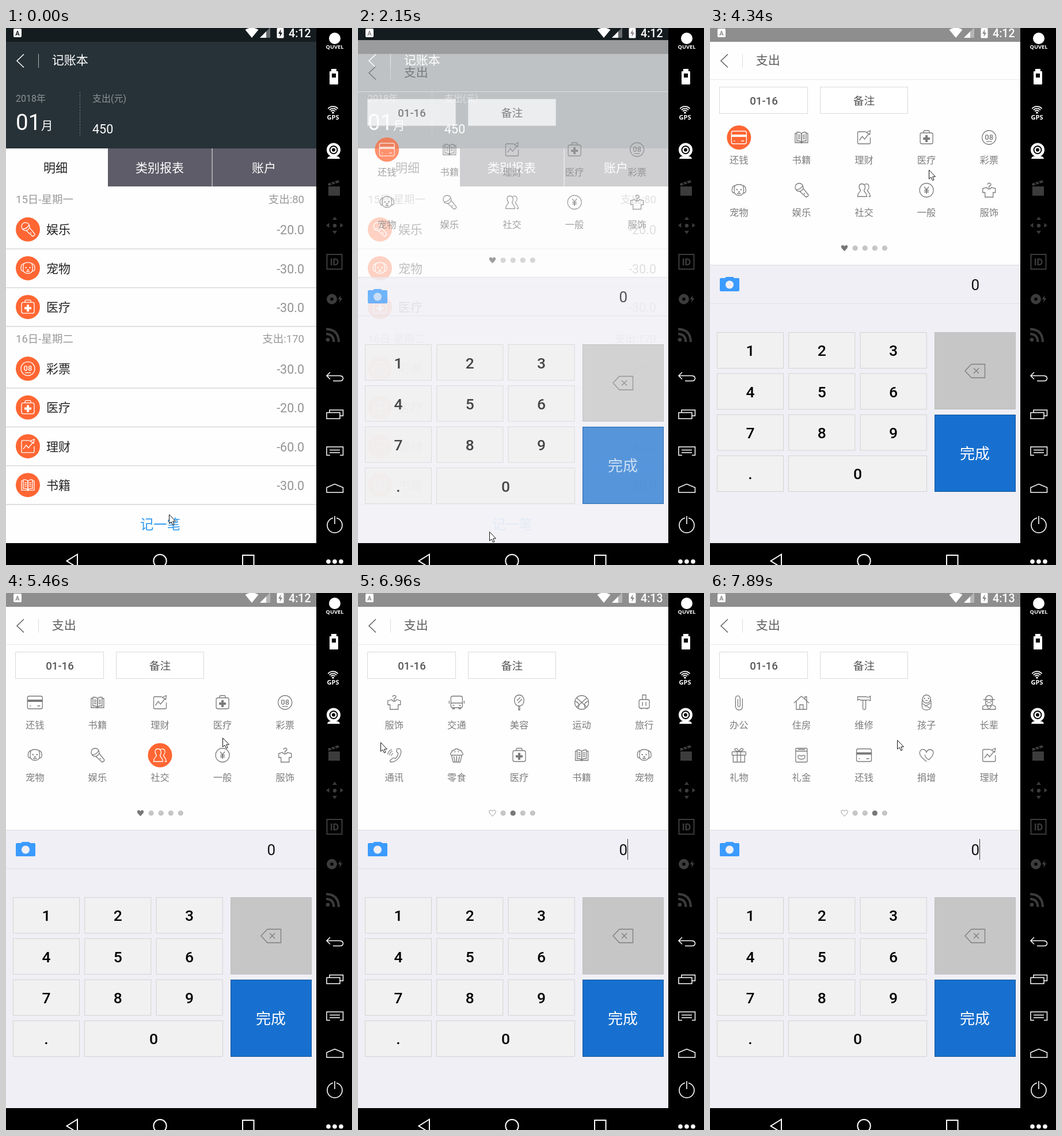
These frames come from a looping animation (601 px wide and 932 px high, 8 s). An HTML page with a canvas:

```html
<!DOCTYPE html>
<html lang="zh">
<head>
<meta charset="utf-8">
<title>记账本</title>
<style>
html, body { margin: 0; width: 100%; height: 100%; overflow: hidden; background: #000; }
canvas { display: block; }
</style>
</head>
<body>
<canvas id="stage" width="601" height="932"></canvas>
<script>
const ctx = document.getElementById('stage').getContext('2d');
const FONT = 'Roboto, "Noto Sans CJK SC", "Noto Sans CJK", sans-serif';
const LOOP = 8000, PAGE = 543, PITCH = PAGE / 5, BAR = 24, BOTTOM = 894, ORANGE = '#ff6633';

// ---- drawing helpers ----
function rect(x, y, w, h, fill, border) {
  if (fill) { ctx.fillStyle = fill; ctx.fillRect(x, y, w, h); }
  if (border) { ctx.strokeStyle = border; ctx.lineWidth = 1; ctx.strokeRect(x + .5, y + .5, w - 1, h - 1); }
}
function disc(x, y, r, color) {
  ctx.fillStyle = color;
  ctx.beginPath(); ctx.arc(x, y, r, 0, 7); ctx.fill();
}
function ring(x, y, r, color, w) {
  ctx.strokeStyle = color; ctx.lineWidth = w;
  ctx.beginPath(); ctx.arc(x, y, r, 0, 7); ctx.stroke();
}
function line(d, color, w = 1.5) {
  ctx.strokeStyle = color; ctx.lineWidth = w;
  ctx.stroke(new Path2D(d));
}
function shape(d, color) {
  ctx.fillStyle = color;
  ctx.fill(new Path2D(d), 'evenodd');
}
function text(s, x, cy, size, color, align = 'left', weight = 400, font = FONT) {
  ctx.font = `${weight} ${size}px ${font}`;
  ctx.textAlign = align;
  ctx.fillStyle = color;
  const lift = /[^\x00-\x7f]/.test(s) ? .375 : .358;
  ctx.fillText(s, x, cy + size * lift);
}
const O = (x, y, r) => `M${x + r} ${y}A${r} ${r} 0 1 1 ${x - r} ${y}A${r} ${r} 0 1 1 ${x + r} ${y}`;
const R = (x, y, w, h, r = 2) => `M${x + r} ${y}h${w - 2 * r}q${r} 0 ${r} ${r}v${h - 2 * r}q0 ${r} ${-r} ${r}h${2 * r - w}q${-r} 0 ${-r} ${-r}v${2 * r - h}q0 ${-r} ${r} ${-r}`;

// ---- category icons: right half (mirrored), whole outline, solid part ----
const EYES = y => O(-3.5, y, 1.2) + O(3.5, y, 1.2);
const ICONS = {
  一般: ['M0-1L4-6M0-1V6M0 0H4M0 3H4', O(0, 0, 12)],
  餐饮: ['M0-3H13C13 4 9 8 5 9V12H0M0 9H5M10-3Q9-9 0-10'],
  购物: ['M0-12Q5-12 5-9V-3M0 7H10', R(-10, -7, 20, 19)],
  服饰: ['M4-5L11-3V4H7V12H0M0-2Q3-2 4-5', 'M0-3V-7Q4-8 3-11Q0-14-3-10'],
  交通: ['M0 1H10M13-3V2M4 9V11H7V9M4 5H7', R(-10, -11, 20, 20, 3)],
  娱乐: ['', O(-4, -5, 7) + 'M-10-1Q-2 0 2-8M3-3L12 8Q12 11 8 12L-3 2M4 5L6 7'],
  社交: ['', 'M-4-11C-10-11-9-3-6 0C-6 4-11 3-11 11H5C5 4 0 4 0 0C3-3 3-11-4-11ZM1-10C10-14 10-3 6 0C6 4 11 4 11 11H8'],
  居家: ['M0-10H5Q8-10 8-6M0 4H7M0 9H11V1Q14-3 9-5Q7-5 7-2V9M9 9V12'],
  通讯: ['', 'M5-11Q12-13 12-6C11 4 4 11-5 12Q-9 11-6 8L-2 5Q0 4 2 6Q7 1 7-4Q4-5 4-8ZM-8 0Q-8-5-3-7M-5 1Q-4-2-2-3M-11-1Q-11-8-4-10'],
  零食: ['M0 12H6L9 0H0M9 0Q13-2 9-5Q8-9 4-9Q3-11 0-11M5 2L3 11M0 2V11M2-6H4'],
  美容: ['M0-13C11-13 11 6 0 6M1 6V13H0', 'M-4-3L2-9M-2 1L5-6'],
  运动: ['M9-8L-9 8M12-2Q2 0 6 10', O(0, 0, 12)],
  旅行: ['M0-13H3V-5M3-1V6M5 10V12', R(-9, -5, 18, 15, 3)],
  数码: ['M0 11H5M0 7V11', R(-12, -10, 24, 17)],
  烟酒: ['M0-11H8Q8 2 0 3V11H6M0-5H7'],
  学习: ['M0-9L13-3L0 3M7 0V7Q5 10 0 10'],
  汽车: ['M0-9H6L9-2M8 8V11M5 3H8', R(-12, -2, 24, 10)],
  医疗: ['M0-12H3Q5-12 5-10V-8', R(-11, -8, 22, 19, 3), 'M-2-4H2V0H6V4H2V8H-2V4H-6V0H-2Z'],
  书籍: ['M0-7Q4-10 8-9V6Q4 5 0 8ZM8-7H11V9H1L0 10M2-4H6M2-1H6M2 2H6'],
  宠物: ['M0-10Q4-10 7-8Q9-2 8 4Q6 9 0 9M7-8Q12-7 12 0Q12 5 8 5M0 6Q2 6 3 5', '', EYES(-1) + 'M-2 2H2L0 5Z'],
  彩票: ['M0 7H5', O(0, 0, 12)],
  办公: ['', 'M-2-6V6Q0 9 2 6V-8Q0-13-4-11Q-6-10-6-7V7Q-5 13 0 13Q6 13 6 7V-7'],
  住房: ['M0-11L13 1M9-2V12H0M3 12V4H0', 'M6-6V-10H9V-3'],
  维修: ['', 'M-11-10H4Q8-8 11-11V-3Q8-5 4-4H-6Q-8-7-11-4ZM-2-4V11Q0 14 3 11V-4'],
  孩子: ['M7-5Q9 4 7 10Q5 13 0 13M0-3L2-4', O(0, -6, 7) + 'M-7 2L6 10M7 1L-3 7', EYES(-7)],
  长辈: ['M0-12Q6-12 6-5V1Q5 6 0 6M0-5H10M5 4L11 7V12H0M0 0L3 1M4 6L0 12', '', EYES(-2)],
  礼物: ['M10 0V12H0M3-6V12M0-6Q9-8 7-11Q3-14 0-6', R(-12, -6, 24, 6, 1)],
  礼金: ['M0-7H10M0-10H6M0 2Q3-1 6 1Q7 7 0 7', R(-10, -12, 20, 24)],
  还钱: ['', R(-13, -11, 26, 22, 3) + 'M4 6H9M-9 6H-7', 'M-13-5H13V-1H-13Z'],
  捐增: ['', 'M0 11Q-12 2-12-4Q-11-11-5-10Q-1-9 0-5Q2-10 6-10Q12-9 12-4Q11 2 4 8Q-2 5-3-1'],
  理财: ['', 'M3-10H-9Q-11-10-11-8V9Q-11 11-9 11H9Q11 11 11 9V0M-8 5L-3-2L1 3L9-7M4-9L11-12L10-5Z'],
};
function icon(name, x, y, color) {
  const [half, whole, solid] = ICONS[name];
  ctx.save();
  ctx.translate(x, y);
  if (whole) line(whole, color, 1.3);
  if (solid) shape(solid, color);
  if (name === '彩票') text('08', 0, -1, 13, color, 'center', 500);
  line(half, color, 1.3);
  ctx.scale(-1, 1);
  line(half, color, 1.3);
  ctx.restore();
}

// each page: upper row, lower row
const PAGES = [
  '还钱 书籍 理财 医疗 彩票 宠物 娱乐 社交 一般 服饰',
  '一般 餐饮 购物 服饰 交通 娱乐 社交 居家 通讯 零食',
  '美容 运动 旅行 数码 烟酒 医疗 书籍 宠物 学习 汽车',
  '办公 住房 维修 孩子 长辈 礼物 礼金 还钱 捐增 理财',
].map(p => p.split(' '));

// ---- motion ----
const clamp = u => Math.min(1, Math.max(0, u));
const smooth = u => (u = clamp(u), u * u * (3 - 2 * u));

// a swipe: start, then where the pointer comes back to
const SWIPES = [[5643, 386, 252], [6597, 345, 255], [7230, 325, 255]];
const CLICKS = [1630, 5040];
// pointer moves: start, duration, goal
const MOVES = [
  [550, 400, 250, 755], [950, 410, 228, 874], [2150, 690, 137, 320], [2990, 400, 380, 246],
  [4340, 390, 263, 280], [5180, 280, 376, 251],
  ...SWIPES.flatMap(([s, x, y]) => [[s, 300, 39, 259], [s + 370, 257, x, y]]),
];
function mouse(t) {
  let x = t < 120 ? 283 : 280, y = t < 120 ? 844 : 853;
  for (const [start, span, gx, gy] of MOVES) {
    const k = smooth((t - start) / span);
    x += (gx - x) * k;
    y += (gy - y) * k;
  }
  return [Math.round(x), Math.round(y)];
}
const scrollAt = t => SWIPES.reduce((sum, [s]) => sum + PAGE * smooth((t - s) / 660), 0);
const caretOn = t => t > SWIPES[0][0] || Math.floor((t - 2940) / 560) % 2 === 1;

// ---- screens ----
function titleBar(title, color, rule) {
  line('M31 45.500L19 57L31 68.500', color, 1.5);
  rect(56, 45, 1, 24, rule);
  text(title, 79.7, 55.5, 21, color);
}
function row(name, amount, y) {
  disc(38, y, 21, ORANGE);
  icon(name, 38, y, '#fff');
  text(name, 70, y, 21, '#222');
  text(amount, 518, y + 1, 21.5, '#939393', 'right');
  rect(0, y + 33, 539, 1.5, '#d8d8d8');
}
// a day heading followed by its rows; returns the next y
function day(title, sum, y, items) {
  text(title, 17, y, 18.5, '#999');
  text(sum, 518, y, 18.5, '#999', 'right');
  items.forEach(([name, cost], i) => row(name, `-${cost}.0`, y + 52.3 + i * 67.3));
}
function ledger() {
  rect(0, 0, 539, BOTTOM, '#fefefe');
  rect(0, 0, 539, BAR, '#151c1f');
  rect(0, BAR, 539, 209 - BAR, '#273238');
  titleBar('记账本', '#fff', '#b0b6b9');
  text('2018年', 17, 122, 16, '#8c9598');
  text('01', 17, 163, 38.5, '#fff');
  text('月', 61, 169.5, 20.5, '#fff');
  ctx.setLineDash([3, 2]);
  line('M128.500 111V188', '#69747a', 1);
  ctx.setLineDash([]);
  text('支出(元)', 150, 122, 16, '#8c9598');
  text('450', 150, 175, 21.5, '#fff');
  rect(177, 209, 362, 66, '#5d5c68');
  rect(357.5, 209, 1.2, 66, '#d5d5d8');
  ['明细', '类别报表', '账户'].forEach((s, i) =>
    text(s, 86 + i * 181, 242.5, 21, i ? '#fff' : '#222', 'center'));
  day('15日-星期一', '支出:80', 297.3, [['娱乐', 20], ['宠物', 30], ['医疗', 30]]);
  day('16日-星期二', '支出:170', 539, [['彩票', 30], ['医疗', 20], ['理财', 60], ['书籍', 30]]);
  text('记一笔', 268, 861, 23.3, '#2d98f2', 'center');
}

function categories(t) {
  const scroll = scrollAt(t);
  const chosen = t < CLICKS[1] ? '还钱' : '社交';
  PAGES.forEach((names, p) => names.forEach((name, i) => {
    const x = 50.3 + (i % 5) * PITCH + p * PAGE - scroll;
    if (x < -40 || x > 580) return;
    const y = i < 5 ? 190 : 281.5, on = p === 0 && name === chosen;
    if (on) disc(x, y, 21, ORANGE);
    icon(name, x, y, on ? '#fff' : '#7a7a7a');
    text(name, x, y + 38.5, 16.3, '#7d7d7d', 'center');
  }));
  const page = Math.round(scroll / PAGE);
  const heart = 'M233.500 387.500L228.500 382Q226.500 377 230.500 377Q233 377 233.500 379Q234 377 236.500 377Q240.500 377 238.500 382Z';
  if (page === 0) shape(heart, '#777'); else line(heart, '#999', 1);
  for (let i = 1; i < 5; i++) disc(235 + i * 17.1, 382, 4.6, page === i ? '#777' : '#c5c5c5');
}
function key(label, x, y, w) {
  rect(x, y, w, 63, '#f1f1f1', '#d2d2d4');
  text(label, x + w / 2, y + 32, 26.5, '#000', 'center', 500);
}
function entry(t) {
  rect(0, 0, 539, BOTTOM, '#fefefe');
  rect(0, 0, 539, BAR, '#8e8e8e');
  titleBar('支出', '#5f5f5f', '#ddd');
  rect(0, 89, 539, 1, '#e9e9e9');
  rect(16, 102, 154, 47, '#fff', '#dadada');
  rect(191, 102, 153, 47, '#fff', '#dadada');
  text('01-16', 93.5, 126, 18.7, '#555', 'center', 500);
  text('备注', 267.5, 125.5, 18.7, '#555', 'center');
  categories(t);

  rect(0, 411, 539, BOTTOM - 411, '#f0eff5');
  rect(0, 411, 539, 1, '#dcdce0');
  rect(0, 478, 539, 1, '#dedee2');
  shape(R(17, 434, 34, 23, 2) + 'M26 434L28 432H40L42 434Z', '#3b9bff');
  disc(34, 445.5, 7, '#f0eff5');
  text('0', 460.7, 446, 26, '#111', 'center');
  if (caretOn(t)) rect(468, 427, 1, 36, '#333');

  for (let i = 0; i < 9; i++) key(String(i + 1), 12 + (i % 3) * 124.3, 528 + Math.floor(i / 3) * 71.3, 116);
  key('.', 12, 742, 116);
  key('0', 136, 742, 241);
  rect(390, 528, 141, 134, '#c6c6c6', '#bdbdbd');
  line('M443 595L454 583.500H477.500V607H454ZM458 590.500L467 599.500M467 590.500L458 599.500', '#7d7d7d', 1.3);
  rect(390, 671, 141, 134, '#1770cf', '#14549a');
  text('完成', 460, 738, 26, '#fff', 'center');
}

// ---- device frame ----
function statusIcons(t, back) {
  shape(R(13, 1, 14, 15, 2), '#fff');
  text('A', 20, 9, 11, back, 'center', 700);
  shape('M415.500 3Q427-4 438.500 3L427 17Z', '#fff');
  shape('M441 17L459 -1V17Z', 'rgba(255,255,255,.35)');
  shape('M441 17L452 6V17Z', '#fff');
  shape(R(470.5, 0, 12, 17.5, 1.5), '#fff');
  shape('M477.500 2L473 10H476L475.500 15.500L480 8H477Z', back);
  text(t < 5890 ? '4:12' : '4:13', 491, 9, 19.6, '#fff', 'left', 500);
}
function frame() {
  rect(0, BOTTOM, 601, 38, '#000');
  rect(539, 0, 62, 932, '#000');
  line('M105.500 925L124 913.500V936.500Z', '#fff', 2);
  ring(267.5, 925, 11.2, '#fff', 2);
  line('M411 915H430.500V935H411Z', '#fff', 2);

  const dim = '#3c3c3c', lit = '#fff', bold = '"Open Sans", "DejaVu Sans", sans-serif';
  disc(571, 18, 10, lit);
  text('QUVEL', 571, 32.5, 9.3, lit, 'center', 700, bold);
  shape(R(562, 75, 15, 23, 1) + 'M565 71H574V75H565ZM566 79H573V86H566Z', lit);
  disc(568, 147, 1.8, lit);
  for (let i = 0; i < 3; i++) {
    ctx.beginPath();
    ctx.arc(568, 148, 5 + i * 3.4, -2.4, -.75);
    ctx.lineWidth = 1.8;
    ctx.strokeStyle = lit;
    ctx.stroke();
  }
  text('GPS', 568, 155.5, 11, lit, 'center', 700, bold);
  disc(569, 211.5, 12, lit);
  ring(569, 211.5, 6.5, '#000', 2);
  disc(569, 211.5, 3, '#000');
  shape('M558 227Q559 222.500 564 222.500H574Q579 222.500 580 227Z', lit);

  shape('M560 275H580V291H560ZM559 270L577 264L579 268L560 274Z', dim);
  line('M564 268L567 272M570 266L573 270', '#000', 1.5);
  disc(571, 343, 3.2, dim);
  for (let i = 0; i < 4; i++) {
    ctx.save();
    ctx.translate(571, 342.5);
    ctx.rotate(i * Math.PI / 2);
    shape('M0-15L4-9.500H-4Z', dim);
    ctx.restore();
  }
  line('M557.500 393H583.500V418.500H557.500Z', dim, 2);
  text('ID', 570.5, 406, 16.5, dim, 'center', 700);
  shape(O(566, 470.5, 9) + O(566, 470.5, 2.8), dim);
  shape('M581.500 463.500L576.500 471H580L578.500 477L584.500 469H581Z', dim);
  disc(559, 541, 3.3, dim);
  line('M556 531Q569 531 569.500 545M556 522.500Q577.500 523 578 545', dim, 4);

  line('M563 597.500L557 603.500L563 609.500M557 603.500H580Q585.500 604 585.500 608Q585.500 612.500 580 612.500H568', lit);
  line('M557 667.500H580V678H557ZM562 667V663H585.500V673H580', lit);
  line('M563 741.500H557V727H585.500V741.500H580M562 732.500H580M562 737H580', lit);
  line('M557 806V797.500L571 791.500L585.500 797.500V806Z', lit);
  ring(571, 863, 13, lit, 1.6);
  line('M571 846V861', '#000', 6);
  line('M571 847V861', lit, 1.6);
  for (let i = 0; i < 3; i++) disc(560 + i * 11, 926, 3.8, lit);
}
function pointer(t) {
  const [x, y] = mouse(t);
  if (CLICKS.some(c => t >= c && t < c + 120)) {
    ring(x + .5, y + .5, 9, '#fff', 1);
    ring(x + .5, y + .5, 10, '#000', 1);
  }
  ctx.save();
  ctx.translate(x + .5, y + .5);
  const d = 'M0 0V15.500L3.500 12.500L6 18L8.500 17L6.200 11.500H11Z';
  shape(d, '#fff');
  line(d, '#111', 1);
  ctx.restore();
}

function render(t) {
  const open = clamp((t - 2050) / 300), ease = 1 - (1 - open) ** 3;
  ctx.save();
  ctx.beginPath(); ctx.rect(0, 0, 539, BOTTOM); ctx.clip();
  if (open < 1) ledger();
  if (t >= 2150) {
    ctx.save();
    ctx.globalAlpha = ease;
    ctx.translate(0, 72 * (1 - ease));
    entry(t);
    ctx.restore();
  }
  statusIcons(t, t < 2150 ? '#151c1f' : '#8e8e8e');
  ctx.restore();
  frame();
  pointer(t);
}

function loop() {
  render(performance.now() % LOOP);
  requestAnimationFrame(loop);
}
loop();
</script>
</body>
</html>
```
